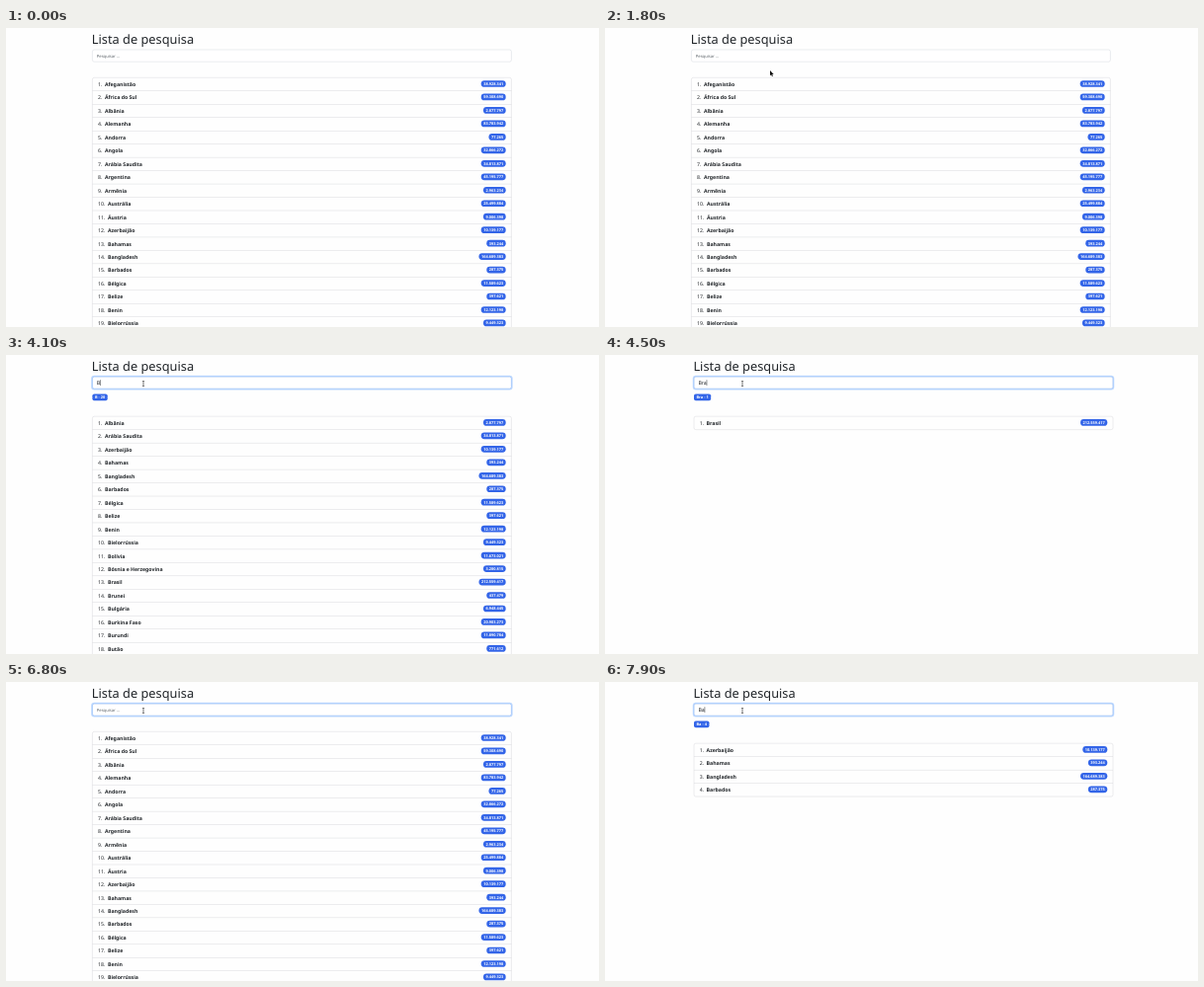
Write an HTML page with a canvas that moves like this. It is 600x303 px and loops after 8000 ms.

```html
<!DOCTYPE html>
<html lang="pt">
<head>
<meta charset="utf-8">
<title>Lista de pesquisa</title>
<style>
  html, body { margin: 0; width: 100%; height: 100%; overflow: hidden; background: #fefefe; }
  canvas { display: block; width: 600px; height: 303px; }
</style>
</head>
<body>
<canvas id="stage"></canvas>
<script>
const W = 600, H = 303, LOOP = 8000;
const BLUE = '#3365e8', INK = '#212529';
const FONT = '"Noto Sans", "Open Sans", sans-serif';
const ROW = 13.47, LEFT = 87.4, WIDTH = 424;

const countries = `Afeganistão 38.928.341|África do Sul 59.308.690|Albânia 2.877.797
Alemanha 83.783.942|Andorra 77.265|Angola 32.866.272|Arábia Saudita 34.813.871
Argentina 45.195.777|Armênia 2.963.234|Austrália 25.499.884|Áustria 9.006.398
Azerbaijão 10.139.177|Bahamas 393.244|Bangladesh 164.689.383|Barbados 287.375
Bélgica 11.589.623|Belize 397.621|Benin 12.123.198|Bielorrússia 9.449.323
Bolívia 11.673.021|Bósnia e Herzegovina 3.280.815|Brasil 212.559.417|Brunei 437.479
Bulgária 6.948.445|Burkina Faso 20.903.273|Burundi 11.890.784|Butão 771.612
Cabo Verde 555.987|Camboja 16.718.965`.split(/[|\n]/).map(line => {
  const cut = line.lastIndexOf(' ');
  return { name: line.slice(0, cut), people: line.slice(cut + 1) };
});

// [time, value] pairs; a value holds until the next time
const typing = [[0, ''], [4000, 'B'], [4200, 'Br'], [4500, 'Bra'], [4700, 'Bras'],
  [5000, 'Brasi'], [5100, 'Brasil'], [6000, ''], [7200, 'B'], [7500, 'Ba']];
const blink = [[0, false], [2200, true], [2800, false], [3400, true],
  [5600, false], [6200, true], [6800, false], [7200, true]];
const FOCUS = 2200;

// time, x, y of the pointer
const pointer = [[200, 493, 279], [400, 310, 150], [600, 170, 40], [700, 138, 12],
  [800, 132, 6], [900, 155, 20], [1000, 171, 34], [1100, 167, 43], [1800, 167, 43],
  [1900, 163, 40], [2000, 154, 35], [2100, 144, 31], [2200, 139, 29]];

const canvas = document.getElementById('stage');
const ctx = canvas.getContext('2d');
const ratio = window.devicePixelRatio || 1;
canvas.width = W * ratio;
canvas.height = H * ratio;

function valueAt(keys, t) {
  let value = keys[0][1];
  for (const [time, next] of keys) if (t >= time) value = next;
  return value;
}

function pointerAt(t) {
  if (t < pointer[0][0]) return null;
  const next = pointer.findIndex(p => p[0] > t);
  if (next < 0) return pointer[pointer.length - 1].slice(1);
  const [t0, x0, y0] = pointer[next - 1], [t1, x1, y1] = pointer[next];
  const k = (t - t0) / (t1 - t0);
  return [x0 + (x1 - x0) * k, y0 + (y1 - y0) * k];
}

// Draws text and returns its width
function text(str, x, y, size, color = INK, weight = 400) {
  ctx.font = `${weight} ${size}px ${FONT}`;
  ctx.fillStyle = color;
  ctx.fillText(str, x, y);
  return ctx.measureText(str).width;
}

function box(x, y, w, h, r) {
  ctx.beginPath();
  ctx.roundRect(x, y, w, h, r);
}

function outline(color, width) {
  ctx.strokeStyle = color;
  ctx.lineWidth = width;
  ctx.stroke();
}

function badge(str, x, cy, radius, alignRight) {
  ctx.font = `700 3.9px ${FONT}`;
  const w = ctx.measureText(str).width + 5;
  const left = alignRight ? x - w : x;
  box(left, cy - 3.35, w, 6.7, radius);
  ctx.fillStyle = BLUE;
  ctx.fill();
  text(str, left + 2.5, cy + 1.4, 3.9, '#fff', 700);
}

function drawInput(x, query, t) {
  const glow = Math.max(0, Math.min(1, (t - FOCUS + 75) / 150));
  box(x, 22, WIDTH, 12.2, 1.9);
  ctx.fillStyle = '#fff';
  ctx.fill();
  outline('#c9ced6', 0.4);
  if (glow) {
    ctx.globalAlpha = glow;
    box(x - 0.6, 21.4, WIDTH + 1.2, 13.4, 2.4);
    outline('#c2dbfe', 1.3);
    box(x, 22, WIDTH, 12.2, 1.9);
    outline('#86b7fe', 0.5);
    ctx.globalAlpha = 1;
  }
  let caret = x + 4.4;
  if (query) caret += text(query, caret, 29.9, 5.2);
  else text('Pesquisar ...', caret, 29.6, 4.15, '#5c6369');
  if (valueAt(blink, t)) {
    ctx.fillStyle = INK;
    ctx.fillRect(caret, 25.2, 0.5, 5.8);
  }
}

function drawList(x, top, rows) {
  box(x, top, WIDTH, rows.length * ROW, 1.9);
  outline('#cfd0d4', 0.4);
  rows.forEach(({ name, people }, i) => {
    const y = top + i * ROW;
    if (y > H) return;
    if (i) {
      ctx.fillStyle = '#cfd0d4';
      ctx.fillRect(x, y - 0.2, WIDTH, 0.4);
    }
    const w = text(`${i + 1}.`, x + 5.7, y + 8.6, 5.2);
    text(name, x + 5.7 + w + 2.5, y + 8.6, 5.2, INK, 700);
    badge(people, x + WIDTH - 5.7, y + 6.2, 3.35, true);
  });
}

function drawArrow(x, y) {
  const shape = [[0, 0], [0, 5.3], [1.2, 4.3], [2, 6.2], [2.9, 5.8], [2.1, 4], [3.7, 3.9]];
  ctx.beginPath();
  for (const [dx, dy] of shape) ctx.lineTo(x + dx, y + dy);
  ctx.closePath();
  outline('#fff', 0.9);
  ctx.fillStyle = '#111';
  ctx.fill();
}

function drawBeam(x, y) {
  ctx.fillStyle = '#222';
  ctx.fillRect(x - 0.3, y - 2.6, 0.6, 5.2);
  ctx.fillRect(x - 1.1, y - 2.9, 2.2, 0.5);
  ctx.fillRect(x - 1.1, y + 2.4, 2.2, 0.5);
}

function draw(t) {
  const query = valueAt(typing, t);
  const rows = countries.filter(c => c.name.toLowerCase().includes(query.toLowerCase()));
  // A short page has no scrollbar, so the centred column moves right
  const x = LEFT + (rows.length > 17 ? 0 : 2.6);

  ctx.setTransform(ratio, 0, 0, ratio, 0, 0);
  ctx.textRendering = 'geometricPrecision';
  ctx.fillStyle = '#fefefe';
  ctx.fillRect(0, 0, W, H);

  text('Lista de pesquisa', x - 0.6, 15.8, 12.8, INK, 500);
  drawInput(x, query, t);
  if (query) badge(`${query} - ${rows.length}`, x, 42.8, 1.9, false);
  drawList(x, query ? 62.2 : 50.3, rows);

  const at = pointerAt(t);
  if (at) {
    const inside = at[1] > 22 && at[1] < 34 && at[0] > x;
    (inside ? drawBeam : drawArrow)(...at);
  }
}

function frame() {
  const t = performance.now() % LOOP;
  draw(Math.floor(t / 100) * 100);
  requestAnimationFrame(frame);
}
frame();
</script>
</body>
</html>
```
